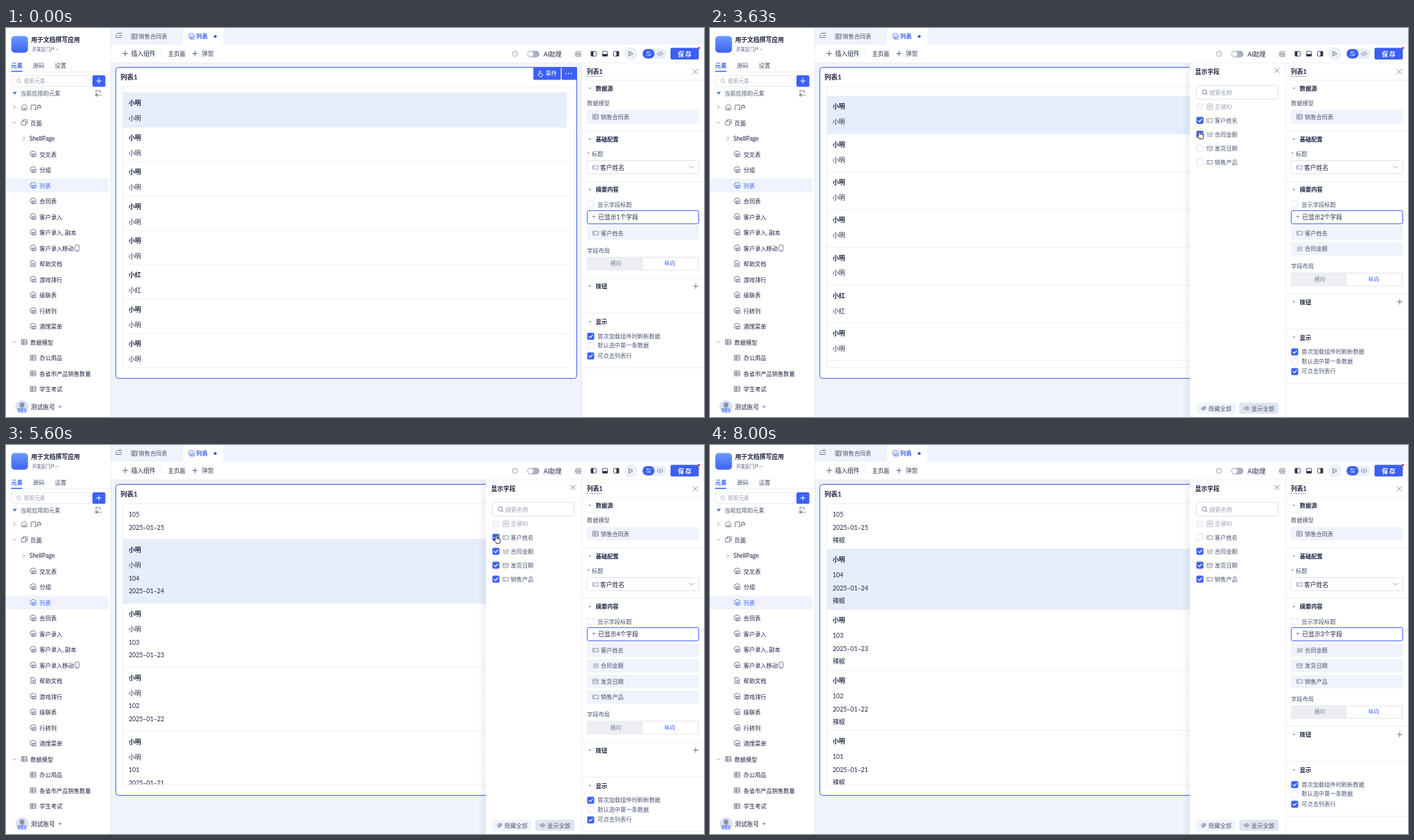
Write an HTML page that moves like this. It is 1001 px wide and 559 px high and loops after 9.37 s.

```html
<!DOCTYPE html>
<html lang="zh-CN">
<head>
<meta charset="utf-8">
<title>列表字段配置</title>
<style>
html, body { margin: 0; width: 100%; height: 100%; overflow: hidden; background: #f0f3fc; }
svg { display: block; width: 100%; height: 100%; }
text { font-family: Lato, "Noto Sans CJK SC", "Noto Sans CJK", sans-serif; white-space: pre; }
</style>
</head>
<body>
<svg id="stage" viewBox="0 0 1001 559">
  <defs>
    <linearGradient id="logo" x1="0" y1="0" x2="0" y2="1"><stop stop-color="#6a9bfa"/><stop offset="1" stop-color="#3f63f2"/></linearGradient>
    <linearGradient id="shade"><stop stop-color="#1c2a55" stop-opacity="0"/><stop offset="1" stop-color="#1c2a55" stop-opacity=".07"/></linearGradient>
    <clipPath id="listClip"><rect x="167" y="85" width="642" height="403"/></clipPath>
    <clipPath id="face"><circle cx="23" cy="544.5" r="9.8"/></clipPath>
  </defs>
  <g id="base"></g>
  <g id="rows" clip-path="url(#listClip)"></g>
  <g id="frame"></g>
  <g id="side"></g>
  <g id="drawer"></g>
  <g id="cursor"><path/></g>
</svg>
<script>
const BLUE = '#3b60f6', INK = '#1b2340', SOFT = '#49546f', MUTED = '#9aa2b5', LINE = '#e8ebf2', CHIP = '#f0f3fb';
const LOOP = 9370;
const $ = id => document.getElementById(id);

// Drawing helpers; text is placed by its vertical centre.
const text = (x, cy, s, size = 8.2, fill = INK, bold = 0, anchor = 'start') =>
  `<text x="${x}" y="${cy + size * .37}" font-size="${size}" fill="${fill}" font-weight="${bold ? 700 : 400}" text-anchor="${anchor}">${s}</text>`;
const rect = (x, y, w, h, fill, r = 0, stroke = 'none', sw = .8) =>
  `<rect x="${x}" y="${y}" width="${w}" height="${h}" rx="${r}" fill="${fill}" stroke="${stroke}" stroke-width="${sw}"/>`;
const line = (d, color = SOFT, w = .8, fill = 'none') =>
  `<path d="${d}" fill="${fill}" stroke="${color}" stroke-width="${w}" stroke-linejoin="round" stroke-linecap="round"/>`;
const disc = (x, y, r, fill, stroke = 'none', sw = .8) =>
  `<circle cx="${x}" cy="${y}" r="${r}" fill="${fill}" stroke="${stroke}" stroke-width="${sw}"/>`;
const hline = (x, y, w, color = LINE) => rect(x, y - .4, w, .8, color);
const plus = (x, y, r, color, w = .9) => line(`M${x - r} ${y}h${2 * r}M${x} ${y - r}v${2 * r}`, color, w);
const cross = (x, y, r) => line(`M${x - r} ${y - r}l${2 * r} ${2 * r}m0 ${-2 * r}l${-2 * r} ${2 * r}`, '#68738b', .8);
const caret = (x, y, r, color) => `<path d="M${x - r} ${y - r * .55}h${2 * r}l${-r} ${r * 1.2}z" fill="${color}"/>`;
const chevDown = (x, y, r, color = '#7d879c') => line(`M${x - r} ${y - r / 2}l${r} ${r}l${r} ${-r}`, color);
const chevRight = (x, y) => line(`M${x - 1.2} ${y - 2.5}l2.5 2.5l-2.5 2.5`, '#7d879c');
const lens = (x, y, r, color) => disc(x, y, r, 'none', color, .7) + line(`M${x + r * .7} ${y + r * .7}l${r * .6} ${r * .6}`, color, .7);

const icons = {
  page: (x, y, c = SOFT) => line(`M${x + 3.8} ${y - .8}A4 4 0 1 0 ${x - .5} ${y + 3.9}M${x - 1.5} ${y + .3}h5.3v3.6h-4.3zM${x + .8} ${y + .5}v3`, c, .8),
  doc: (x, y) => line(`M${x - 3} ${y - 4}h4l2.3 2.3v5.9h-6.3zM${x - 1.3} ${y}h3M${x - 1.3} ${y + 2}h3`, SOFT, .8),
  table: (x, y, c = SOFT) => line(`M${x - 3.7} ${y - 3.5}h7.4v7h-7.4zM${x - 3.7} ${y - 1.2}h7.4M${x - 3.7} ${y + 1.2}h7.4M${x - 1.2} ${y - 3.5}v7`, c, .7),
  input: (x, y) => line(`M${x - 3.8} ${y - 2.5}h7.6v5h-7.6zM${x - 2.2} ${y - 1}v2`, '#65718f', .7),
  number: (x, y) => text(x, y - .6, '123', 4.8, '#65718f', 1, 'middle') + line(`M${x - 3.8} ${y + 2.6}h7.6`, '#65718f', .7),
  date: (x, y) => line(`M${x - 3.5} ${y - 3}h7v6.2h-7zM${x - 3.5} ${y - 1}h7M${x - 1} ${y + 1}h2`, '#65718f', .7),
  id: (x, y) => rect(x - 4, y - 4, 8, 8, 'none', 1, MUTED) + text(x, y, 'ID', 5, MUTED, 1, 'middle')
};

const checkbox = (x, cy, on, disabled) =>
  rect(x - 4.5, cy - 4.5, 9, 9, disabled ? '#f6f7fa' : '#fff', 1.5, disabled ? '#dfe3eb' : '#d3d9e6', .7) +
  (on > 0 ? `<g opacity="${on}">${rect(x - 5, cy - 5, 10, 10, BLUE, 1.8)}${line(`M${x - 2.5} ${cy}l1.9 2l3.2 -3.8`, '#fff', 1.2)}</g>` : '');

function drawBase() {
  let s = rect(0, 0, 1001, 559, '#f0f3fc') + rect(0, 0, 150, 559, '#fff') + rect(150, 0, .8, 559, '#e4e8f2');

  // Sidebar header
  s += rect(7.5, 11.5, 24, 24, 'url(#logo)', 5) + text(36, 16.3, '用于文档撰写应用', 8.75, INK, 1);
  s += text(37.5, 30.8, '开发区门户', 6.5, SOFT) + chevDown(73, 30.8, 1.8);
  s += text(7.5, 54, '元素', 8.2, BLUE, 1) + text(38.5, 54, '源码', 8.2, SOFT) + text(70, 54, '设置', 8.2, SOFT);
  s += hline(0, 63, 150) + rect(7.5, 61.6, 16, 1.5, BLUE);
  s += rect(8, 68.4, 113, 15.6, '#fff', 2, '#dde1ea') + lens(18, 75.8, 2.6, MUTED) + text(25.5, 76.2, '搜索元素', 7.7, MUTED);
  s += rect(124, 68, 18.5, 16.4, BLUE, 2) + plus(133.2, 76.2, 3.4, '#fff', 1);
  s += caret(12.5, 93.6, 3.2, '#4a7db5') + text(20.5, 94, '当前应用的元素', 8.2, SOFT);
  s += line('M129 90h6v3.2M129 90v2M129 96.5h3M134 96.5h2.5M128.8 94.8v3.2h2.5v-3.2z', SOFT, .7);

  // Component tree
  s += chevRight(12, 113.5) + line('M22.8 112.5l3.5 -3l3.5 3v5h-7zM25.2 117.5v-2.5h2v2.5', SOFT, .7) + text(35, 114, '门户');
  s += chevDown(12, 136, 2.3) + line('M22.5 134h6v5.5h-6zM24.5 134v-2.2h6v5.5h-2', SOFT, .7) + text(35, 136.5, '页面');
  s += chevRight(25.5, 159) + text(33.5, 159, 'ShellPage', 8.7);
  s += rect(0, 216.3, 147, 20, '#f0f3fd');
  ['交叉表', '分组', '列表', '合同表', '客户录入', '客户录入_副本', '客户录入移动', '帮助文档', '游戏排行', '级联表', '行转列', '酒馆菜单'].forEach((name, i) => {
    const y = 181.5 + 22.5 * i, c = i == 2 ? BLUE : undefined;
    s += (i == 7 ? icons.doc : icons.page)(39, y - .5, c) + text(48, y, name, 8.2, c);
  });
  s += rect(99.2, 312, 5.6, 8.8, 'none', 1, SOFT, .7) + hline(101, 319.2, 2, SOFT);
  s += chevDown(12, 451.5, 2.3) + icons.table(26.3, 451.3) + text(35, 451.8, '数据模型');
  ['办公用品', '各省市产品销售数量', '学生考试'].forEach((name, i) => {
    s += icons.table(39, 473.8 + 22.5 * i) + text(48, 474.3 + 22.5 * i, name);
  });
  s += `<g clip-path="url(#face)">${disc(23, 544.5, 9.8, '#d9e2f5')}${disc(23, 541.5, 3.5, '#8793ad')}<path d="M16 551q1-6 7-6t7 6z" fill="#a7b4d0"/></g>`;
  s += rect(15.5, 547, 15, 5.6, '#e9effc', 2) + text(23, 549.8, '管理员', 4.4, BLUE, 1, 'middle');
  s += text(35.5, 544.5, '测试账号', 8.75) + caret(77.3, 544.6, 2.8, MUTED);

  // Tabs
  s += rect(254, 0, 57.5, 25, '#fff', 2);
  s += line('M160.5 7.5h5M162.5 10.5h3M157.5 13.5h8M159.5 8.3l-2 2l2 2', SOFT, .8);
  s += icons.table(184.3, 12) + text(190.3, 12.2, '销售合同表', 8.2, SOFT);
  s += icons.page(266.2, 12, BLUE) + text(272.8, 12.2, '列表', 8.2, BLUE, 1) + disc(300, 12.2, 2.1, BLUE);

  // Toolbar
  s += rect(150.8, 24, 851, 26, '#fff') + hline(150.8, 50, 851);
  s += plus(171, 36.7, 3.8, SOFT) + text(179.5, 37, '插入组件', 8.75) + rect(222, 32, .7, 10, '#e0e4ec');
  s += text(232.5, 37, '主页面') + plus(271, 36.7, 3.5, SOFT) + text(280.5, 37, '弹窗', 8.75, SOFT);
  s += disc(730, 37, 3.8, 'none', '#77829a', .7) + text(730, 37, '?', 5.6, '#77829a', 0, 'middle');
  s += rect(747.5, 32.8, 17.6, 9.4, '#a9b1c1', 4.7) + disc(752.4, 37.5, 3.8, '#fff') + text(771, 37.3, 'AI助理', 8.75);
  s += line('M817 34h7.5M817 40.5h7.5M817 36.2h2.8v2.4h-2.8zM821.6 36.2h2.8v2.4h-2.8z', SOFT, .7);
  [[839, 33.7, 3.4, 6.6], [855.3, 37.4, 7.4, 3], [875.4, 33.7, 3.4, 6.6]].forEach((p, i) => {
    s += rect([839, 855.3, 871.5][i], 33.6, 7.4, 6.8, '#fff', .8, '#26304a', .8) + rect(...p, '#26304a');
  });
  s += disc(896, 37, 9.6, '#edf0f9') + line('M893.8 34l5 3l-5 3z', SOFT, .8);
  s += rect(911.5, 29.8, 36, 14.4, '#e9edf9', 7.2) + rect(913, 30.3, 17, 13.4, BLUE, 6.7);
  s += line('M918.5 35h6M918.5 38.8h6M920.2 34v2M922.8 37.8v2', '#fff', .8);
  s += line('M936 34.8l-2 2.2l2 2.2M940 34.8l2 2.2l-2 2.2M938.8 34.2l-1.6 5.6', SOFT, .7);
  s += rect(953, 28.6, 40.6, 16.6, BLUE, 2) + text(973.3, 37.3, '保 存', 8.75, '#fff', 1, 'middle') + disc(993.8, 28.8, 1.7, '#f04438');

  // Card
  s += rect(157.5, 56.5, 661, 447, '#fff', 4, BLUE, 1) + text(164, 70.8, '列表1', 9.5, INK, 1);
  s += rect(167.6, 84.6, 640.6, 403.6, '#fff', 0, LINE);
  $('base').innerHTML = s;

  s = rect(756.3, 56, 39.3, 18.6, BLUE, 1.5) + rect(796.8, 56, 22.2, 18.6, BLUE, 1.5);
  s += line('M764.8 66.2v-4.2q1-1.2 1.8 0v3.2l3 .8v2.4l-1 1.4h-3.3l-2.2-3z', '#fff', .8) + text(773.7, 65.4, '事件', 8.2, '#fff');
  s += [802.8, 806.6, 810.4].map(x => disc(x, 65.3, .9, '#fff')).join('');
  $('frame').innerHTML = s;
}

const FIELDS = [['客户姓名', 'input'], ['合同金额', 'number'], ['发货日期', 'date'], ['销售产品', 'input']];

function drawRows({ shown, pad, scroll }) {
  const h = 30.6 + 18.8 * shown.length + pad;
  let s = '';
  for (let i = 0; i < 9; i++) {
    const top = 85 + i * h - scroll, name = i == 6 ? '小红' : '小明';
    const values = [name, 105 - i, `2025–01–${25 - i}`, '辣椒'];
    if (i == 1) s += rect(168, top, 636, h, '#e6edfc');
    s += hline(168, top + h, 636) + text(176, top + 15.2, name, 8.75, INK, 1);
    shown.forEach((f, k) => s += text(176, top + 37.1 + 18.8 * k, values[f], 8.75));
  }
  $('rows').innerHTML = s;
}

function drawSide(picked) {
  const shift = 22.5 * (picked.length - 1);
  const head = (y, s) => caret(837.3, y, 2, '#8b94a8') + text(845.8, y, s, 8.2, INK, 1);
  const rule = y => hline(826, y, 175);
  let s = rect(826, 50.4, 175, 509, '#fff') + rect(825.6, 50.4, .8, 509, LINE);
  s += text(833, 62.6, '列表1', 8.75, INK, 1) + `<path d="M833 69.5h22" stroke="${SOFT}" stroke-width=".7" stroke-dasharray="2 1.5"/>` + cross(988.5, 63, 3.4);
  s += rule(75) + head(86.8, '数据源') + text(833.3, 108.3, '数据模型', 8.2, SOFT);
  s += rect(833, 117.8, 160.8, 19.4, CHIP, 2) + icons.table(845.7, 127.5, '#65718f') + text(853, 127.8, '销售合同表', 8.2, SOFT);
  s += rule(148.3) + head(160, '基础配置') + text(833.5, 182, '*', 8.5, '#f04438') + text(840, 181.2, '标题', 8.2, SOFT);
  s += rect(833.5, 190.6, 160, 18.8, '#fff', 2, '#d6dbe6') + icons.input(845.4, 200.4) + text(852, 200.3, '客户姓名', 8.75) + chevDown(983, 200, 3.2);
  s += rule(220.6) + head(232.4, '摘要内容') + checkbox(838.5, 253.5, 0) + text(848.3, 253.7, '显示字段标题', 8.2, SOFT);
  s += rect(833.6, 262.4, 159.8, 19, '#fff', 2, BLUE, 1) + caret(843, 271.3, 2.4, '#8b94a8') + text(849.2, 272.2, `已显示${picked.length}个字段`, 8.75);
  picked.forEach((f, i) => {
    const y = 294.7 + 22.5 * i;
    s += rect(833, y - 9.7, 160.8, 19.4, CHIP, 2) + icons[FIELDS[f][1]](845.7, y) + text(853, y + .2, FIELDS[f][0], 8.2, SOFT);
  });
  s += `<g transform="translate(0 ${shift})">` + text(833.3, 319.8, '字段布局', 8.2, SOFT);
  s += rect(833, 328.8, 160.8, 20, '#eceef4', 2) + rect(913, 330.4, 78.8, 16.8, '#fff', 2);
  s += text(874.5, 338.4, '横向', 7.7, '#77819a', 0, 'middle') + text(952, 338.4, '纵向', 7.7, BLUE, 0, 'middle');
  s += rule(359.6) + head(371.2, '按钮') + plus(989, 371, 3.5, SOFT, .8) + rule(409.6) + head(422, '显示');
  ['首次加载组件时刷新数据', '默认选中第一条数据', '可点击列表行'].forEach((label, i) => {
    const y = [442.7, 456.3, 470.8][i];
    s += checkbox(838.5, y + .4, i != 1) + text(848.3, y, label, 8.2, SOFT);
  });
  $('side').innerHTML = s + rule(488.2) + '</g>';
}

function drawDrawer(open, checks) {
  let s = '';
  if (open) {
    s += rect(677, 50.4, 11, 509, 'url(#shade)') + rect(688, 50.4, 138, 509, '#fff') + rect(825.6, 50.4, .8, 509, LINE);
    s += text(695.7, 62.5, '显示字段', 8.75, INK, 1) + cross(813.2, 61, 3.2);
    s += rect(697.6, 82.6, 117.2, 19.6, '#fff', 2, '#d6dbe6') + lens(709, 92, 3, SOFT) + text(716, 92.7, '搜索名称', 8.2, MUTED);
    s += checkbox(702.6, 113, 0, 1) + icons.id(716.8, 113.2) + text(723.8, 113.2, '主键ID', 8.2, MUTED);
    FIELDS.forEach(([label, icon], i) => {
      const y = 133 + 20 * i;
      s += checkbox(702.6, y - .2, checks[i]) + icons[icon](716.8, y) + text(723.8, y + .4, label, 8.2, SOFT);
    });
    [['隐藏全部', 697.5, CHIP], ['显示全部', 759, '#dfe4ef']].forEach(([label, x, fill], i) => {
      s += rect(x, 538.4, 56.2, 16.2, fill, 2) + line(`M${x + 7} 546.5q3.7 -5 7.4 0q-3.7 5 -7.4 0z`, SOFT, .7);
      s += disc(x + 10.7, 546.5, 1, SOFT) + (i ? '' : line(`M${x + 8} 549.5l5.5 -6`, SOFT, .8)) + text(x + 17.6, 546.8, label, 8.2, SOFT);
    });
  }
  $('drawer').innerHTML = s;
}

// Clicks toggle a field at once; the list refreshes later.
const CLICKS = [5880, 3390, 4270, 5080];
const STAGES = [
  [0, [0], 0], [3500, [0], 4.9], [3790, [0, 1], 0], [4430, [0, 1], 4.9], [4710, [0, 1, 2], 0],
  [5200, [0, 1, 2], 4.9], [5680, [0, 1, 2, 3], 0], [6200, [1, 2, 3], 0]
];

// Pointer track: time, x, y, hand?
const TRACK = [
  [370, 733, 18, 0], [600, 803, 70, 0], [850, 892, 160, 0], [1050, 914, 218, 0], [1290, 905, 272.5, 0], [1550, 905, 272.5, 0],
  [1570, 906, 273.5, 1], [1700, 906, 273.5, 1], [1930, 893.5, 273.5, 1], [2480, 893.5, 273.5, 0], [2580, 830, 236, 0],
  [2640, 776, 205, 1], [2670, 760.5, 192.5, 1], [2900, 718, 162, 1], [3230, 702, 149, 1], [3900, 702, 149, 1],
  [4150, 703, 171, 1], [4270, 703, 172, 1], [4350, 707.5, 179, 1], [4750, 702, 191, 1], [5140, 702, 191, 1],
  [5560, 703, 131, 1], [6000, 703, 131, 0], [6160, 775, 92, 0], [6280, 840, 72, 0], [6400, 892, 95, 0],
  [6540, 892, 95, 0], [6720, 954, 30, 0], [6840, 976, 35, 1], [7160, 976, 35, 1], [7320, 962, 15, 0],
  [7480, 937, 10, 0], [7720, 880, 43, 0], [8000, 781, -9, 0]
];
const ARROW = 'M0 0V8.6L2 6.8L3.4 9.8L4.8 9.2L3.5 6.3H6Z';
const HAND = 'M-1.1 5.5V.6Q-1 -.3 0 -.3T1.1 .6V3.6Q2 3 2.9 3.8Q3.8 3.4 4.5 4.2Q5.8 4 5.8 5.4V7.5Q5.6 9 4.8 10.3H0Q-1 8.5 -3 6.4Q-3.3 5.3 -2.2 5.2Z';

function slope(i, a) {
  const p = TRACK[i - 1], q = TRACK[i], n = TRACK[i + 1];
  if (!p || !n || (n[a] - q[a]) * (q[a] - p[a]) <= 0) return 0;
  return (n[a] - p[a]) / (n[0] - p[0]);
}

function pointerAt(t) {
  if (t < TRACK[0][0] || t >= 8000) return null;
  const i = TRACK.findIndex(p => p[0] > t) - 1, p = TRACK[i], q = TRACK[i + 1];
  const d = q[0] - p[0], u = (t - p[0]) / d, v = 1 - u;
  const at = a => (1 + 2 * u) * v * v * p[a] + u * v * v * d * slope(i, a) + u * u * (3 - 2 * u) * q[a] - u * u * v * d * slope(i + 1, a);
  return { x: at(1), y: at(2), hand: p[3] };
}

const last = {};
function update(key, value, draw) {
  const sig = JSON.stringify(value);
  if (last[key] !== sig) { last[key] = sig; draw(); }
}

function render(t) {
  const picked = [0, 1, 2, 3].filter(i => i ? t >= CLICKS[i] : t < CLICKS[0]);
  const checks = CLICKS.map((c, i) => {
    const u = Math.max(0, Math.min(1, (t - c) / 160));
    return i ? u : 1 - u;
  });
  const [, shown, pad] = STAGES.filter(s => s[0] <= t).pop();
  const list = { shown, pad, scroll: shown[0] ? 22.6 : 41.4 };
  const open = t >= 2220;
  update('rows', list, () => drawRows(list));
  update('side', picked, () => drawSide(picked));
  update('drawer', [open, checks], () => drawDrawer(open, checks));

  const p = pointerAt(t), g = $('cursor'), shape = g.firstElementChild;
  g.setAttribute('visibility', p ? 'visible' : 'hidden');
  if (!p) return;
  g.setAttribute('transform', `translate(${p.x.toFixed(2)} ${p.y.toFixed(2)})`);
  shape.setAttribute('d', p.hand ? HAND : ARROW);
  shape.setAttribute('fill', p.hand ? '#fff' : '#111');
  shape.setAttribute('stroke', p.hand ? '#111' : '#fff');
  shape.setAttribute('stroke-width', p.hand ? .9 : .5);
}

drawBase();
const start = performance.now();
function tick() {
  render((performance.now() - start) % LOOP);
  requestAnimationFrame(tick);
}
tick();
</script>
</body>
</html>
```
